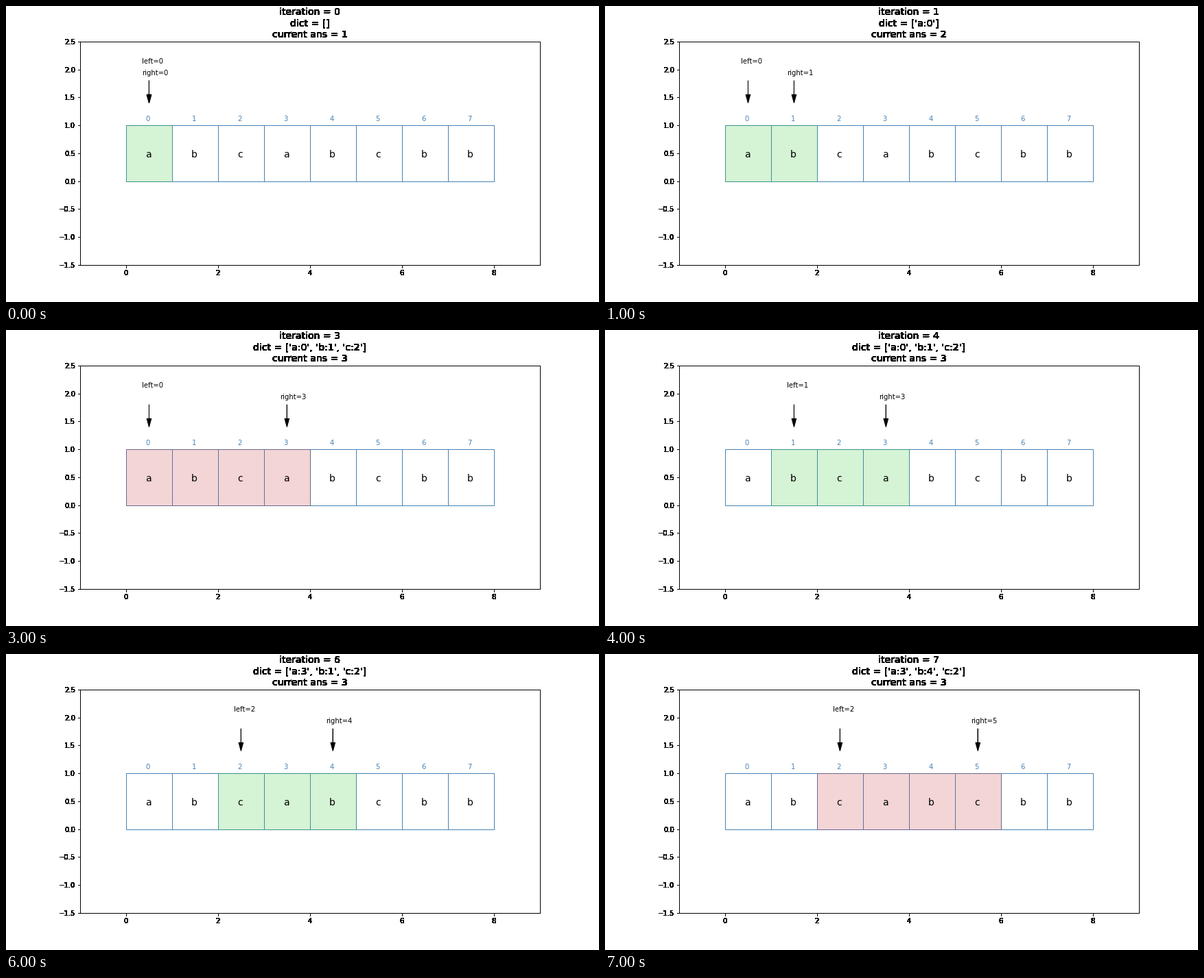
These frames come from a looping animation (864 px wide and 432 px high, 8000 ms). A matplotlib script:

```python
import numpy as np
import matplotlib.pyplot as plt
from matplotlib.animation import FuncAnimation
from matplotlib.patches import Rectangle

WORD = "abcabcbb"
STEPS = 8
GOOD, BAD = (0.18, 0.77, 0.18), (0.77, 0.18, 0.2)

plt.rcParams.update({"font.family": "DejaVu Sans", "font.size": 10})


def sliding_window(word, steps):
    """List (left, right, valid, entries, best) for each step of the search."""
    states, seen = [], {}
    left = right = best = 0
    for _ in range(steps):
        char = word[right]
        valid = seen.get(char, -1) < left
        if valid:
            best = max(best, right - left + 1)
        entries = [f"{c}:{i}" for c, i in seen.items()]
        states.append((left, right, valid, entries, best))
        if valid:
            seen[char] = right
            right += 1
        else:
            left = seen.pop(char) + 1
            seen = dict(sorted({**seen, char: left - 1}.items()))
    return states


def harden(img, dpi):
    """Turn every touched pixel solid black, for the jagged outer lettering."""
    out = np.zeros_like(img)
    out[..., 3] = img[..., 3] > 0.02
    return out, 0, 0


def make_arrow():
    return ax.arrow(0.5, 1.8, 0, -0.25, head_width=0.1, head_length=0.15,
                    fc="black", ec="black")


fig = plt.figure(figsize=(12, 6), dpi=72, facecolor="white")
ax = fig.add_axes([0.125, 0.125, 0.775, 0.755])
ax.set(xlim=(-1, 9), ylim=(-1.5, 2.5), xticks=range(0, 9, 2))

for i, char in enumerate(WORD):
    ax.add_patch(Rectangle((i, 0), 1, 1, fill=False, ec="steelblue"))
    ax.text(i + 0.42, 0.42, char, fontsize=14)
    ax.text(i + 0.43, 1.08, str(i), color="steelblue")

window = ax.add_patch(Rectangle((0, 0), 1, 1, alpha=0.2))
arrows = [make_arrow(), make_arrow()]
labels = [ax.text(0.35, 2.1, ""), ax.text(0.35, 1.9, "")]
title = ax.set_title("", fontsize=14)

for artist in (title, ax.xaxis, ax.yaxis, *ax.spines.values()):
    artist.set_agg_filter(harden)

states = sliding_window(WORD, STEPS)


def draw(step):
    left, right, valid, entries, best = states[step]
    title.set_text(f"iteration = {step}\ndict = {entries}\ncurrent ans = {best}")
    window.set_x(left)
    window.set_width(right - left + 1)
    window.set_color(GOOD if valid else BAD)
    for name, pos, arrow, label in zip(("left", "right"), (left, right),
                                       arrows, labels):
        arrow.set_data(x=pos + 0.5)
        label.set_x(pos + 0.35)
        label.set_text(f"{name}={pos}")
    return [title, window, *arrows, *labels]


anim = FuncAnimation(fig, draw, frames=STEPS, interval=1000, repeat=True)
plt.show()
```
